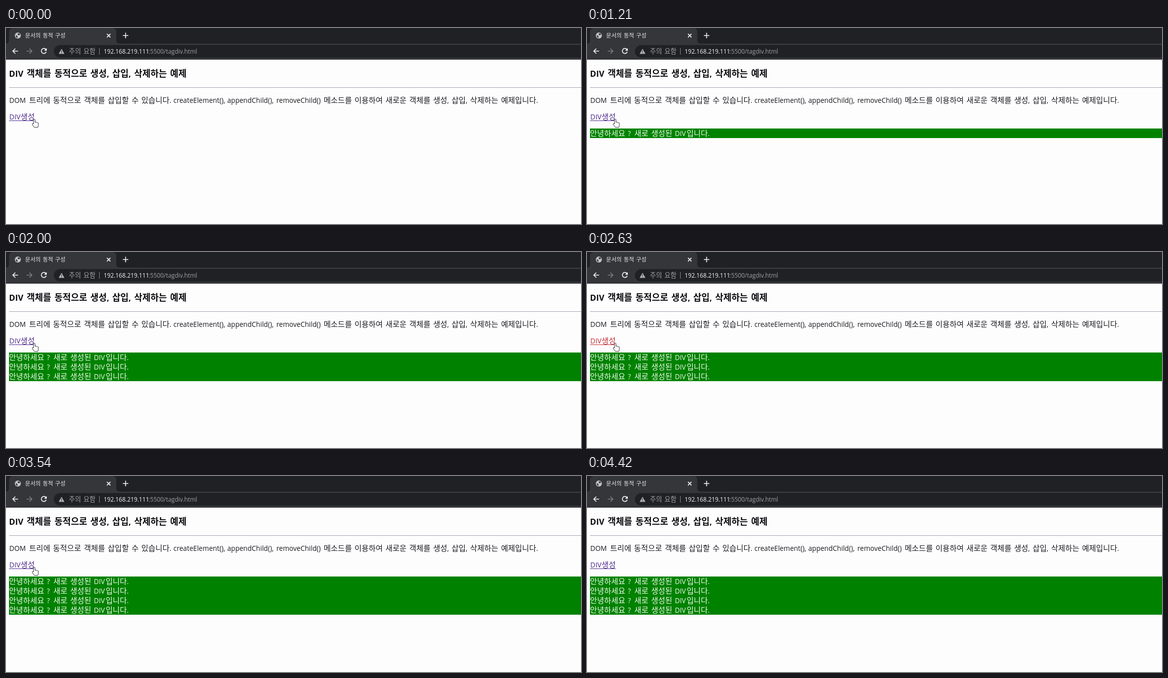
Write an HTML page that moves like this. It is 1142 by 390 pixels and loops after 4540 ms.

```html
<!DOCTYPE html>
<html lang="ko">
<head>
<meta charset="utf-8">
<title>문서의 동적 구성</title>
<style>
  html, body { margin: 0; width: 100%; height: 100%; overflow: hidden; background: #fdfdfe; }
  svg { display: block; width: 1142px; height: 390px; }
  text { font-family: 'Noto Sans CJK KR', 'Noto Sans KR', 'Noto Sans CJK', sans-serif; word-spacing: .125em; white-space: pre; }
  .latin { font-family: 'Open Sans', 'Noto Sans', sans-serif; font-size: .895em; }
  .line { fill: none; stroke-width: 1.7; }
</style>
</head>
<body>
<svg id="stage" viewBox="0 0 1142 390">
  <!-- browser frame -->
  <rect width="1142" height="32" fill="#202124"/>
  <rect y="31" width="1142" height="32" fill="#35363a"/>
  <path d="M0 31Q6 31 6 24V8Q6 0 14 0H211Q219 0 219 8V24Q219 31 225 31Z" fill="#35363a"/>
  <rect x="95" y="34" width="1080" height="25" rx="12.5" fill="#202124"/>
  <circle cx="23.500" cy="15" r="6" fill="#c4c6ca"/>
  <path d="M19.500 14L22 15.500L23 18L22.500 19.800Q19 18.500 19.500 14ZM23 11L27 10.800L28 13L25.500 14.500L23.500 13.500Z" fill="#35363a"/>
  <g class="line" stroke="#f2f3f5">
    <path d="M200.500 11.700L207.500 18.700M207.500 11.700L200.500 18.700"/>
    <path d="M232 15H243M237.500 9.500V20.500"/>
    <path d="M24 46H13.500M18.500 41L13.500 46L18.500 51"/>
    <path d="M79.200 42.600A5 5 0 1 0 80 47.300"/>
  </g>
  <path d="M81 40V45.300H75.700Z" fill="#f2f3f5"/>
  <path class="line" d="M41 46H51.500M46.500 41L51.500 46L46.500 51" stroke="#7c7d82"/>
  <path d="M110.300 41.500L116 51.500H104.600Z" fill="#b4b6ba"/>
  <path d="M110.300 44.800V48M110.300 49V50.300" stroke="#202124" stroke-width="1.2"/>
  <path d="M185.500 40V53" stroke="#85878c"/>

  <!-- page -->
  <path d="M6 118.500H1142" stroke="#a4a4b4"/>
  <g id="rows"></g>
  <g id="labels"></g>
  <g id="link"></g>
  <g id="cursor" stroke="#303034" stroke-linejoin="round" fill="#fdfdfe">
    <path id="hand" d="M-1.800 1.200Q-.3 -.8 1.200 1.200V6.400Q2.600 5.400 3.600 6.900Q5 6 5.900 7.500Q7.700 7 7.700 9V12.500Q7.700 14.500 6.500 16.800H-.2Q-1.600 14.500 -4.500 10.700Q-4.500 8.300 -2.500 9.300L-1.800 10Z"/>
    <path id="arrow" d="M0 0V15L3.500 11.800L6 17L8.200 16L5.800 11H10.500Z"/>
  </g>
</svg>
<script>
const SVG = 'http://www.w3.org/2000/svg';
const LOOP = 4540;
const PRESSES = [[540, 960], [1250, 1460], [1790, 2000], [2590, 3040]];
const EXIT = { start: 3580, end: 4000, dx: 210, dy: 225 };
const ROW_TOP = 200, ROW_HEIGHT = 19;

const byId = id => document.getElementById(id);

function add(parent, tag, attrs = {}, content = '') {
  const node = document.createElementNS(SVG, tag);
  for (const name in attrs) node.setAttribute(name, attrs[name]);
  node.textContent = content;
  return parent.appendChild(node);
}

// Hangul and Latin runs use different faces at matching optical sizes.
function write(parent, x, y, content, size, fill, weight = 400) {
  const text = add(parent, 'text', { x, y, fill, 'font-size': size, 'font-weight': weight });
  for (const run of content.match(/[가-힣]+|[^가-힣]+/g))
    add(text, 'tspan', /[가-힣]/.test(run) ? {} : { class: 'latin' }, run);
}

const labels = byId('labels'), link = byId('link');
write(labels, 38, 18.5, '문서의 동적 구성', 11.2, '#e8eaed');
write(labels, 125, 50.5, '주의 요함', 13.1, '#9aa0a6');
write(labels, 194, 50.5, '192.168.219.111', 13.2, '#f4f5f7');
write(labels, 283, 50.5, ':5500/tagdiv.html', 13.3, '#9aa0a6');

write(labels, 6, 96.5, 'DIV', 18.4, '#0c0c10', 700);
write(labels, 41, 96.5, '객체를 동적으로 생성, 삽입, 삭제하는 예제', 17.7, '#0c0c10', 700);

[
  [6.5, 'DOM'],
  [46, '트리에 동적으로 객체를 삽입할 수 있습니다.'],
  [332.5, 'createElement(),'],
  [439.5, 'appendChild(),'],
  [537, 'removeChild()'],
  [631, '메소드를 이용하여 새로운 객체를 생성, 삽입, 삭제하는 예제입니다.']
].forEach(([x, words]) => write(labels, x, 149, words, 15.2, '#1c1c20'));

write(link, 6.5, 182, 'DIV', 15.6, 'currentColor');
write(link, 29, 182, '생성', 15.2, 'currentColor');
add(link, 'path', { d: 'M6 184.500H57', stroke: 'currentColor' });

const rows = PRESSES.map((_, i) => {
  const row = add(byId('rows'), 'g');
  const y = ROW_TOP + i * ROW_HEIGHT;
  add(row, 'rect', { x: 6, y, width: 1136, height: ROW_HEIGHT, fill: '#008200' });
  [[6, '안녕하세요 ?'], [94, '새로 생성된'], [174.5, 'DIV'], [198, '입니다.']]
    .forEach(([x, words]) => write(row, x, y + 15, words, 15.2, '#eefaea'));
  return row;
});

const show = (node, visible) => node.setAttribute('visibility', visible ? 'visible' : 'hidden');

function render(t) {
  const pressed = PRESSES.some(([down, up]) => t >= down && t < up);
  link.style.color = pressed ? '#c62c34' : '#4f2a8c';
  rows.forEach((row, i) => show(row, t >= PRESSES[i][1]));

  const p = Math.min(1, Math.max(0, (t - EXIT.start) / (EXIT.end - EXIT.start)));
  const x = 56.5 + EXIT.dx * p * p, y = 181 + EXIT.dy * p * p;
  byId('cursor').setAttribute('transform', `translate(${x} ${y})`);
  const onLink = y < 187;
  show(byId('hand'), onLink);
  show(byId('arrow'), !onLink && p < 1);
}

const began = performance.now();
function tick() {
  render((performance.now() - began) % LOOP);
  requestAnimationFrame(tick);
}
tick();
</script>
</body>
</html>
```
